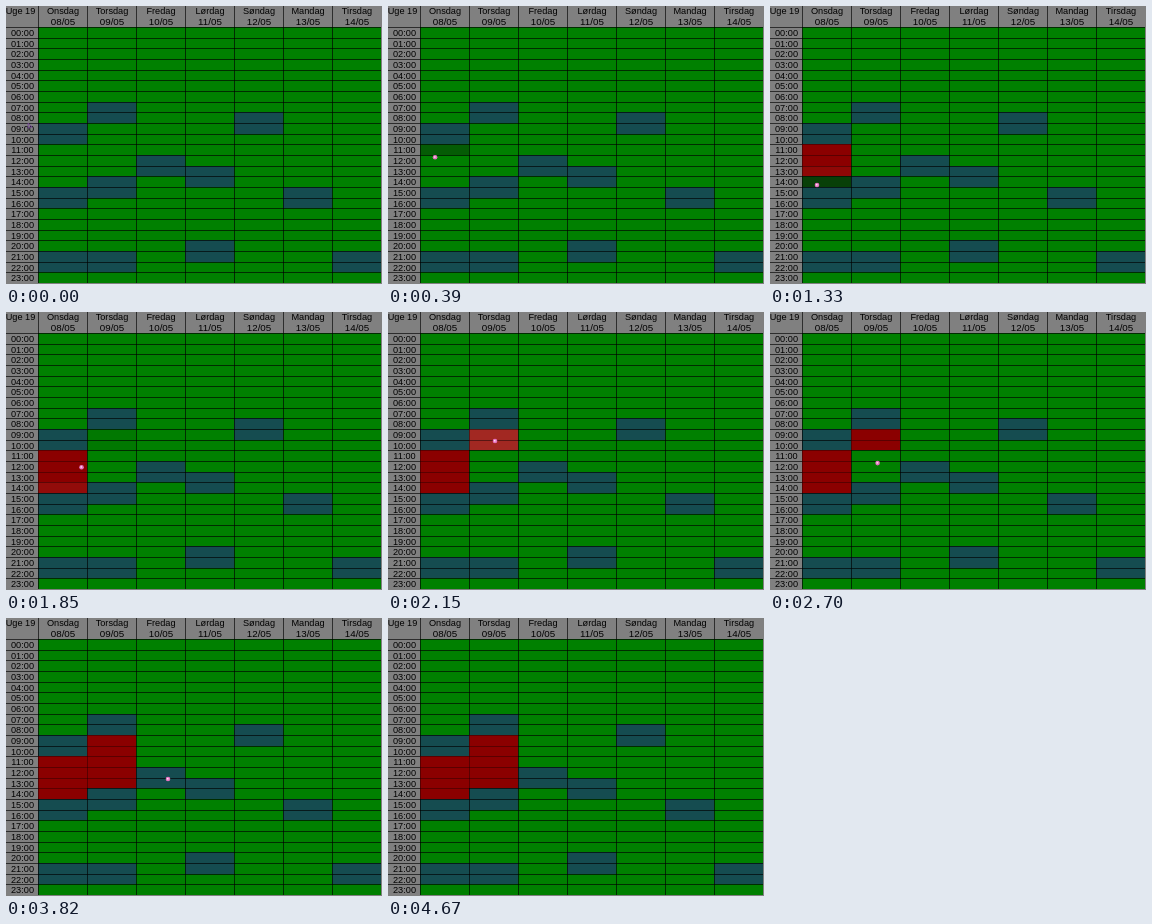
An HTML page with a canvas that plays this animation: 376x278 px, repeating every 4700 ms.

```html
<!DOCTYPE html>
<html lang="da">
<head>
<meta charset="utf-8">
<style>
html, body { margin: 0; width: 100%; height: 100%; overflow: hidden; background: #808080; }
canvas { display: block; }
</style>
</head>
<body>
<canvas id="stage" width="376" height="278"></canvas>
<script>
const ctx = document.getElementById('stage').getContext('2d');
const LOOP = 4700;
const PHASE = 160;
const GRAY = '#808080', GREEN = '#008000', TEAL = '#154c50';
const DAYS = ['Onsdag', 'Torsdag', 'Fredag', 'Lørdag', 'Søndag', 'Mandag', 'Tirsdag'];
// First hours of the two-hour bookings of each day
const BOOKED = [[9, 15, 21], [7, 14, 21], [12], [13, 20], [8], [15], [21]];
// Green, dark green, bright red, red
const FADE = [[0, 128, 0], [8, 64, 8], [162, 40, 34], [139, 0, 0]];
// Real times at which everything rests; the clock below skips them
const HOLDS = [[1330, 1580], [3390, 3550], [4000, 4120]];
const STROKES = [
  { day: 0, first: 11, last: 14, start: 300, step: 290 },
  { day: 1, first: 9, last: 10, start: 1580, step: 0 },
  { day: 1, first: 11, last: 13, start: 2540, step: 140 }
];
const PATH = [
  { at: 0, x: 24, y: 120 }, { at: 330, x: 47, y: 148 }, { at: 730, x: 47.5, y: 169.5 },
  { at: 1330, x: 47, y: 179 }, { at: 1900, x: 107, y: 129 }, { at: 2810, x: 108, y: 165.5 },
  { at: 3140, x: 108, y: 166 }, { at: 3410, x: 162, y: 161 }, { at: 3590, x: 162, y: 161 },
  { at: 4110, x: 390, y: 161 }
];

const colX = day => day < 0 ? 0 : 32 + 49 * day;
const rowY = hour => hour < 0 ? 0 : Math.round(21 + hour * 32 / 3);
const twoDigits = n => String(n).padStart(2, '0');
const mix = (a, b, p) => a + (b - a) * p;

function skipHolds(t) {
  return HOLDS.reduce((rest, [from, to]) => rest - Math.max(0, Math.min(t, to) - from), t);
}

function fadeColor(age) {
  const pos = Math.min(age / PHASE, FADE.length - 1);
  const i = Math.min(Math.floor(pos), FADE.length - 2);
  return `rgb(${FADE[i].map((v, c) => Math.round(mix(v, FADE[i + 1][c], pos - i)))})`;
}

function rect(x, y, w, h, color) {
  ctx.fillStyle = color;
  ctx.fillRect(x, y, w, h);
}

// Day -1 is the hour column, hour -1 the header row
function cell(day, hour, color, lineAlpha = 0.65) {
  const x = colX(day), y = rowY(hour);
  const w = colX(day + 1) - x, h = rowY(hour + 1) - y;
  const line = `rgba(0, 0, 0, ${lineAlpha})`;
  rect(x, y, w, h, color);
  if (hour >= 0) rect(x, y, w, 1, line);
  if (day >= 0) rect(x, y, 1, h, line);
}

function label(text, x, y, size = 9.2) {
  ctx.font = `${size}px "Liberation Sans", Arial, sans-serif`;
  ctx.textAlign = 'center';
  ctx.fillStyle = '#000';
  ctx.fillText(text, x, y);
}

function drawCalendar() {
  rect(0, 0, 376, 278, GRAY);
  for (let day = -1; day < 7; day++) {
    for (let hour = -1; hour < 24; hour++) {
      cell(day, hour, day < 0 || hour < 0 ? GRAY : GREEN);
    }
  }
  BOOKED.forEach((hours, day) => hours.forEach(hour => {
    cell(day, hour, TEAL);
    cell(day, hour + 1, TEAL);
  }));
}

function drawStrokes(clock) {
  for (const { day, first, last, start, step } of STROKES) {
    for (let hour = first; hour <= last; hour++) {
      const age = clock - start - step * (hour - first);
      if (age > 0) cell(day, hour, fadeColor(age), mix(0.65, 0.35, Math.min(1, age / (3 * PHASE))));
    }
  }
}

function drawLabels() {
  label('Uge 19', 14.5, 8);
  DAYS.forEach((name, day) => {
    label(name, colX(day) + 25, 8);
    label(twoDigits(8 + day) + '/05', colX(day) + 25, 19, 9.8);
  });
  for (let hour = 0; hour < 24; hour++) label(twoDigits(hour) + ':00', 16.5, rowY(hour) + 9);
}

function drawCursor(clock) {
  const next = PATH.findIndex(point => point.at > clock);
  if (next < 0) return;
  const a = PATH[next - 1], b = PATH[next];
  const p = (clock - a.at) / (b.at - a.at);
  const x = mix(a.x, b.x, p), y = mix(a.y, b.y, p);
  ctx.beginPath();
  if (x < 32) {
    ctx.moveTo(x - 2, y - 3);
    ctx.lineTo(x + 2, y + 1);
    ctx.lineTo(x - 2, y + 2);
    ctx.closePath();
    ctx.strokeStyle = '#74409a';
    ctx.lineWidth = 0.8;
    ctx.stroke();
  } else {
    ctx.arc(x, y, 2.3, 0, 2 * Math.PI);
    ctx.fillStyle = '#e573c0';
    ctx.fill();
    rect(x - 1, y - 1, 1.5, 1.5, '#fbe4f2');
  }
}

function draw() {
  const clock = skipHolds(performance.now() % LOOP);
  drawCalendar();
  drawStrokes(clock);
  drawLabels();
  drawCursor(clock);
  requestAnimationFrame(draw);
}

draw();
</script>
</body>
</html>
```
